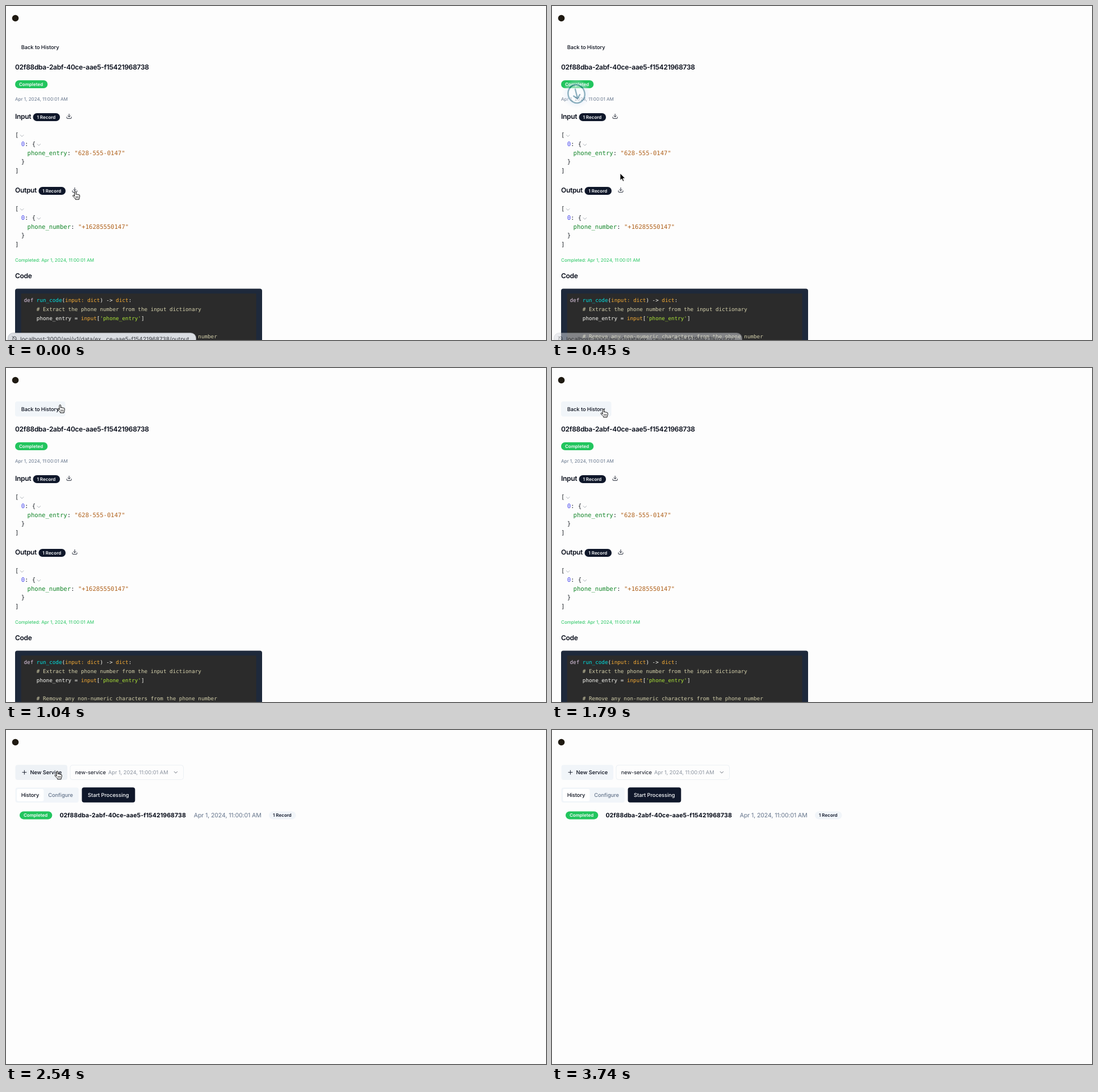
Write an HTML page that moves like this. It is 951 px wide and 589 px high and loops after 4500 ms.

```html
<!DOCTYPE html>
<html lang="en">
<head>
<meta charset="utf-8">
<title>Run details</title>
<style>
  html, body { margin: 0; width: 100%; height: 100%; overflow: hidden; background: #fdfdfd; }
  svg { display: block; width: 951px; height: 589px; }
  text { font: 400 9.27px Inter, sans-serif; letter-spacing: -.05px; fill: #060b18; white-space: pre; text-rendering: geometricPrecision; }
  .m { font-weight: 500; }
  .h { font-weight: 600; font-size: 11.93px; letter-spacing: -.26px; }
  .tag { font-weight: 600; font-size: 7.95px; letter-spacing: .05px; }
  .small { font-size: 8.07px; letter-spacing: 0; }
  .big { font-size: 10.6px; letter-spacing: -.13px; }
  .bold { font-weight: 700; letter-spacing: .05px; }
  .url { font-size: 10.15px; letter-spacing: 0; fill: #3c3f45; }
  .json, .code { font-family: "DejaVu Sans Mono", monospace; letter-spacing: 0; }
  .json { font-size: 10.6px; fill: #24292f; }
  .code { font-size: 9.275px; fill: #f8f8f2; }
  .line { fill: none; stroke: #0b1120; stroke-linecap: round; stroke-linejoin: round; }
</style>
</head>
<body>
<svg viewBox="0 0 951 589" xmlns="http://www.w3.org/2000/svg">
  <defs>
    <radialGradient id="halo">
      <stop offset=".6" stop-color="#dbe8f8"/>
      <stop offset="1" stop-color="#e8f0fb" stop-opacity="0"/>
    </radialGradient>
  </defs>
  <circle cx="16.5" cy="21.5" r="5.8" fill="#1f1a12"/>
  <g id="detail"></g>
  <g id="loading"></g>
  <g id="history"></g>
  <g id="bubble">
    <circle r="26" fill="url(#halo)"/>
    <g transform="rotate(-14)">
      <ellipse rx="14.6" ry="16.2" fill="#f7fbff" stroke="#1d6482" stroke-width="2.4"/>
      <path d="M0-8.5V8M-5.6 2.6L0 8.4L5.6 2.6" class="line" style="stroke:#1d6482;stroke-width:2.4"/>
    </g>
  </g>
  <g id="status"></g>
  <g id="hand" stroke-linejoin="round" stroke-linecap="round">
    <path fill="#fff" stroke="#000" d="M4 9V2a1.3 1.3 0 0 1 2.6 0V6a1.2 1.2 0 0 1 2.3 .3a1.2 1.2 0 0 1 2.2 .5a1.1 1.1 0 0 1 2 .7V10.3c0 1.6-1 2-1 3.4v1H5.6v-1C4.8 12.3 2.4 10.4 1.1 8.7c-.7-1.1 .7-2.1 1.7-1.2z"/>
    <path fill="none" stroke="#000" stroke-width=".7" d="M6.7 9.3v2.8M8.6 9.3v2.8M10.5 9.3v2.8"/>
  </g>
  <path id="arrow" fill="#000" stroke="#fff" stroke-width=".9" d="M0 0V12.4L2.9 9.8L4.9 14.3L6.9 13.4L5 9H8.9Z"/>
</svg>
<script>
const $ = id => document.getElementById(id);
const INK = '#0f172a', PALE = '#f1f5f9', GREEN = '#22c55e', SLATE = '#64748b';
const RUN_ID = '02f88dba-2abf-40ce-aae5-f15421968738';
const DATE = 'Apr 1, 2024, 11:00:01 AM';

const text = (x, y, str, cls = '', fill = '') =>
  `<text x="${x}" y="${y}" class="${cls}"${fill && ` style="fill:${fill}"`}>${str}</text>`;
const box = (x, y, w, h, r, fill, more = '') =>
  `<rect x="${x}" y="${y}" width="${w}" height="${h}" rx="${r}" fill="${fill}" ${more}/>`;
const line = (d, width = .9, more = '') =>
  `<path class="line" d="${d}" stroke-width="${width}" ${more}/>`;
const tag = (x, y, w, str, bg, fill) =>
  box(x, y, w, 14, 7, bg) + text(x + 6.9, y + 9.9, str, 'tag', fill);
const span = (fill, str) => `<tspan style="fill:${fill}">${str}</tspan>`;

const download = (x, y) => line(
  'M21 15v4a2 2 0 0 1-2 2H5a2 2 0 0 1-2-2v-4M7 10l5 5l5-5M12 15V3', 2,
  `transform="translate(${x} ${y}) scale(.4417)"`);
const fold = (x, y) => line(`M${x} ${y}l2.8 2.8l2.8-2.8`, .8, 'style="stroke:#9aa0a8"');

function record(y, title, tagX, key, value) {
  const row = n => y + 35.7 + 15.9 * n;
  return text(16, y + 4.2, title, 'h') +
    tag(tagX, y - 6, 47.6, '1 Record', INK, '#f8fafc') +
    download(tagX + 58.3, y - 5.9) +
    text(16, row(0), '[', 'json') + fold(25.3, row(0) - 3.2) +
    text(26.7, row(1), span('#4545ee', '0') + ': {', 'json') + fold(55, row(1) - 3.2) +
    text(37.6, row(2), span('#118527', key) + ': ' + span('#b0621c', `"${value}"`), 'json') +
    text(26.7, row(3), '}', 'json') +
    text(16, row(4), ']', 'json');
}

function code() {
  const orange = '#f5ab35', note = '#d4d0ab';
  const rows = [
    span('#dcc6e0', 'def') + ' ' + span('#00e0e0', 'run_code') + '(' +
      span(orange, 'input: dict') + ') -&gt; ' + span(orange, 'dict') + ':',
    span(note, '    # Extract the phone number from the input dictionary'),
    '    phone_entry = ' + span(orange, 'input') + '[' + span('#abe338', "'phone_entry'") + ']',
    '',
    span(note, '    # Remove any non-numeric characters from the phone number')
  ];
  return box(16, 498.5, 435, 110, 4, '#1e293b') + box(26.6, 507, 414, 100, 0, '#2b2b2b') +
    rows.map((r, i) => text(31.5, 522.2 + 15.95 * i, r, 'code')).join('');
}

$('detail').innerHTML =
  box(16, 59, 88.5, 26.5, 4, PALE, 'id="backBg"') +
  text(26.8, 75.5, 'Back to History', 'm') +
  text(16, 112.4, RUN_ID, 'h') +
  tag(16, 131, 57.3, 'Completed', GREEN, '#f8fafc') +
  text(16, 166.7, DATE, 'small', SLATE) +
  box(109, 312, 24.5, 26.5, 4, '#eef2f7', 'id="saveBg"') +
  record(195, 'Input', 47.5, 'phone_entry', '628-555-0147') +
  record(325, 'Output', 57.4, 'phone_number', '+16285550147') +
  text(16, 450.8, 'Completed: ' + DATE, 'small', GREEN) +
  text(16, 480.2, 'Code', 'h') +
  code();

const newButton = id => box(16.5, 61.5, 91.5, 26.5, 4, PALE, `id="${id}"`) +
  line('M28.9 74.7h7M32.4 71.2v7') + text(42.6, 78.1, 'New Service', 'm');

$('loading').innerHTML = newButton('newA') +
  line('M21 12a9 9 0 1 1-6.219-8.56', 2, 'transform="translate(429 144) scale(.92)"') +
  text(456.2, 158.9, 'Loading Data', 'big');

$('history').innerHTML = newButton('newB') +
  box(113, 62, 199.5, 25.5, 4, '#fdfdfd', 'stroke="#e8ecf1" stroke-width=".8"') +
  text(121.8, 78.1, 'new-service') + text(180, 78.1, DATE, '', '#8b939f') +
  line('M296.2 73.4l2.7 2.7l2.7-2.7', .9, 'style="stroke:#5f6672"') +
  box(16.5, 101.5, 111.5, 26.5, 4, PALE) + box(19, 104, 47.4, 21.5, 3, '#fff') +
  text(26.7, 118, 'History', 'm') + text(74.3, 118, 'Configure', 'm', SLATE) +
  box(133.6, 101.3, 93.7, 26.5, 4, INK) + text(144.1, 118, 'Start Processing', 'm', '#f8fafc') +
  tag(24, 143.4, 57.3, 'Completed', GREEN, '#f8fafc') +
  text(94.4, 153.5, RUN_ID, 'big bold') +
  text(330.8, 153.5, DATE, 'big', SLATE) +
  tag(463, 143.4, 47.6, '1 Record', PALE, INK);

$('status').innerHTML =
  box(3.5, 576.7, 331, 21, 9, '#dadde2', 'stroke="#b4b8be" stroke-width=".8"') +
  line('M12 590.5v-4.5a3 3 0 0 1 6 0v4.5M11 582.5l8 8', 1, 'style="stroke:#4a4d53"') +
  text(25, 590.6, 'localhost:3000/api/v1/data/ex…ce-aae5-f15421968738/output', 'url');

const poses = [
  [0, 'hand', 116.6, 326.4], [150, 'hand', 116, 326.4], [450, 'arrow', 120, 295],
  [600, 'arrow', 115.8, 258], [750, 'arrow', 97.6, 127.6],
  [900, 'hand', 90, 75], [1040, 'hand', 90, 64.3], [1340, 'hand', 90, 65.5],
  [1490, 'hand', 86, 73], [1640, 'hand', 85.2, 72.8], [1790, 'hand', 85, 72],
  [2990, 'arrow', 134.2, 130.4], [3140, 'arrow', 159, 222.5], [3290, 'arrow', 569, 444.5],
  [3440, 'arrow', 671, 503.5], [3590, 'arrow', 844, 551.5], [3740, '', 0, 0]
];
// Flying download badge: start time, x, y, scale, opacity
const flight = [
  [0, 0, 0, 1, 0], [150, 124, 307, .85, .9], [300, 75, 215, 1, 1],
  [450, 43, 155, 1, .5], [600, 0, 0, 1, 0]
];

const at = (list, t) => list.filter(p => p[0] <= t).pop();
const show = (id, on) => $(id).setAttribute('opacity', Number(on));
const place = (id, x, y, s = 1) =>
  $(id).setAttribute('transform', `translate(${x} ${y}) scale(${s})`);

function render(t) {
  show('detail', t < 2390);
  show('loading', t >= 2390 && t < 2540);
  show('history', t >= 2540);
  show('saveBg', t >= 150 && t < 450);
  show('backBg', t < 900 ? 0 : t < 1040 ? .5 : 1);
  show('status', t < 450 ? 1 : t < 600 ? .5 : 0);
  for (const id of ['newA', 'newB']) $(id).setAttribute('fill', t < 2990 ? '#eef2f6' : PALE);

  const [, bx, by, size, alpha] = at(flight, t);
  place('bubble', bx, by, size);
  show('bubble', alpha);

  const [, shape, x, y] = at(poses, t);
  for (const id of ['hand', 'arrow']) {
    show(id, id === shape);
    place(id, x, y);
  }
}

const start = performance.now();
function tick() {
  render((performance.now() - start) % 4500);
  requestAnimationFrame(tick);
}
tick();
</script>
</body>
</html>
```
